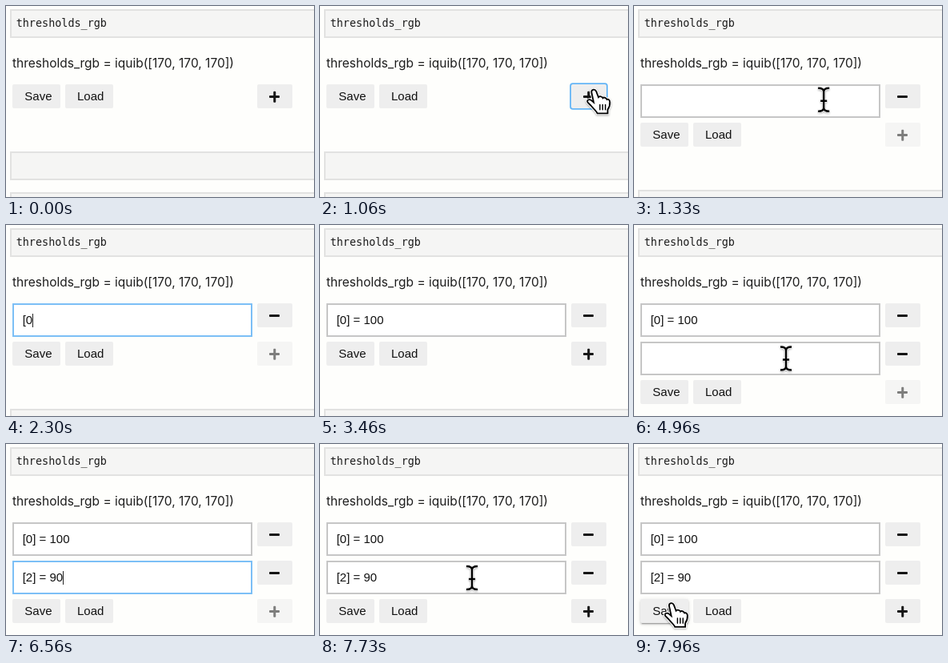
An HTML page that plays this animation: 385 by 239 pixels, repeating every 8 s.

```html
<!DOCTYPE html>
<html lang="en">
<head>
<meta charset="utf-8">
<title>iquib overrides</title>
<style>
  html, body { margin: 0; width: 100%; height: 100%; overflow: hidden; background: #fefefc; }
  #stage { position: relative; width: 385px; height: 239px; overflow: hidden; color: #1c1c1c; }
  #stage div { position: absolute; box-sizing: border-box; white-space: pre; }
  .cell {
    left: 5px; width: 400px; height: 36px; padding-left: 5.7px;
    background: #f5f5f4; border: 2px solid #e2e2e1;
    font: 13.45px/32px "DejaVu Sans Mono", monospace;
  }
  .value { left: 8px; top: 59.5px; font: 15.5px/24px Inter, sans-serif; }
  .button {
    height: 30px; background: #eee; border-radius: 2px;
    font: 15px/30px "Liberation Sans", Arial, sans-serif; color: #111;
  }
  .save { left: 8px; width: 60px; padding-left: 15.3px; }
  .load { left: 74px; width: 60px; padding-left: 15px; }
  .sign { left: 314px; width: 44px; }
  .sign::before, .plus::after {
    content: ""; position: absolute; left: 14.5px; top: 14px;
    width: 13.5px; height: 3px; border-radius: 1px; background: #151515;
  }
  .plus::after { transform: rotate(90deg); }
  .hover { box-shadow: 0 2px 2px rgba(0,0,0,.14), 0 3px 1px -2px rgba(0,0,0,.2), 0 1px 5px rgba(0,0,0,.12); }
  .pressed { box-shadow: 0 0 0 1.8px #64b5f6; }
  .disabled { opacity: .55; }
  .field {
    left: 8px; width: 300px; height: 42px; padding: 0 0 0 10.7px;
    background: #fff; border: 2px solid #c6c6c6; color: #111;
    font: 15px/20px "Liberation Sans", Arial, sans-serif;
  }
  #stage .field { display: flex; align-items: center; }
  #stage .focus { border-color: #7cbff6; }
  .field i { width: 1px; height: 17px; background: #222; }
  #stage [hidden] { display: none; }
  svg { position: absolute; left: 0; top: 0; }
  #cursor { filter: drop-shadow(0 1px 1px rgba(0,0,0,.3)); }
  .arrow path { fill: #000; stroke: #fff; stroke-width: 2; }
  .halo { fill: none; stroke: #fff; stroke-width: 4; }
  .hand path { stroke-linejoin: round; stroke-linecap: round; }
  .hand .ink { fill: #fff; stroke: #000; stroke-width: 2; }
  .beam .ink { fill: none; stroke: #000; stroke-width: 2.5; }
</style>
</head>
<body>
<div id="stage">
  <div class="cell" style="top:4px">thresholds_rgb</div>
  <div class="value">thresholds_rgb = iquib([170, 170, 170])</div>
  <div class="cell" id="next"></div>
  <div class="cell" id="last"></div>
  <div class="field"><span></span><i></i></div>
  <div class="field"><span></span><i></i></div>
  <div class="button sign"></div>
  <div class="button sign"></div>
  <div class="button save">Save</div>
  <div class="button load">Load</div>
  <div class="button sign plus"></div>
  <svg width="385" height="239">
    <defs>
      <path id="palm" d="M-4 3C-4-1 1-1.5 2.5 2L5.5 10C7 8 11 9 11.5 11C13 9.5 16.5 11 17 13C19 12 21 14 21 16.5C21.5 21 20 24 18 27V32H4C3 29-2 25-5 21L-9 17C-11 14-7 12-4.5 14L-1 17Z"/>
      <path id="bar" d="M-7-14.5C-3-14.5 0-13.5 0-10C0-13.5 3-14.5 7-14.5M-7 14.5C-3 14.5 0 13.5 0 10C0 13.5 3 14.5 7 14.5M0-11V11M-4 1.5H4"/>
    </defs>
    <g id="cursor">
      <g class="arrow"><path d="M0 0V23L5 18L9 27L13 25L9 16.5H16Z"/></g>
      <g class="hand" transform="scale(.92)">
        <use href="#palm" class="halo"/>
        <use href="#palm" class="ink"/>
        <path d="M7.5 20V27M11.2 20V27M14.9 20V27" stroke="#000" stroke-width="1.6"/>
      </g>
      <g class="beam">
        <use href="#bar" class="halo"/>
        <use href="#bar" class="ink"/>
      </g>
    </g>
  </svg>
</div>
<script>
const LOOP = 8000, TOP = 98, STEP = 48, BLINK = 268;

const rows = [
  { text: "[0] = 100", add: 1130, focus: 1430, enter: 3460,
    keys: [2130, 2300, 2430, 2530, 2630, 2730, 2800, 2900, 3000] },
  { text: "[2] = 90", add: 4600, focus: 5030, enter: 7260,
    keys: [5600, 5660, 5730, 5830, 6230, 6300, 6460, 6560] }
];
const presses = [[1010, 1130], [4510, 4600]];

// pointer trips: [time, x, y]; typing hides the pointer
const trips = [
  { end: 2130, path: [[730, 376, 83], [930, 349, 102], [1060, 343, 105], [1170, 343, 105], [1400, 208, 120.5]] },
  { end: 5600, path: [[4060, 241, 127], [4130, 363, 158], [4290, 363, 158], [4400, 356, 162], [4620, 356, 162], [4940, 190, 167]] },
  { end: LOOP, path: [[7730, 190, 167.5], [7950, 47.5, 199.5]] }
];

const all = s => [...document.querySelectorAll(s)];
const get = s => document.querySelector(s);
const fields = all(".field"), minus = all(".sign:not(.plus)");
const save = get(".save"), load = get(".load"), plus = get(".plus");
const cursor = get("#cursor");
const within = (t, a, b) => t >= a && t < b;
const place = (el, y) => { el.style.top = y + "px"; };

function pointer(t) {
  const trip = trips.find(p => within(t, p.path[0][0], p.end));
  if (!trip) return null;
  const path = trip.path, i = path.findIndex(k => k[0] > t);
  if (i < 0) return path[path.length - 1].slice(1);
  const [t0, x0, y0] = path[i - 1], [t1, x1, y1] = path[i];
  let u = (t - t0) / (t1 - t0);
  u = u * u * (3 - 2 * u);
  return [x0 + (x1 - x0) * u, y0 + (y1 - y0) * u];
}

function hit(el, p) {
  return p && !el.hidden && within(p[0], el.offsetLeft, el.offsetLeft + el.offsetWidth + 6) &&
    within(p[1], el.offsetTop, el.offsetTop + el.offsetHeight);
}

function drawRow(row, i, t) {
  const field = fields[i], [label, caret] = field.children;
  field.hidden = minus[i].hidden = t < row.add;
  place(field, TOP + STEP * i);
  place(minus[i], TOP + STEP * i);
  const typed = row.keys.filter(k => k <= t).length;
  const focused = within(t, row.focus, row.enter);
  const since = t - (typed ? row.keys[typed - 1] : row.focus);
  label.textContent = row.text.slice(0, typed);
  field.classList.toggle("focus", focused);
  caret.hidden = !focused || Math.floor(since / BLINK) % 2 === 1;
}

function draw(t) {
  rows.forEach((row, i) => drawRow(row, i, t));
  const shift = STEP * rows.filter(r => t >= r.add).length;
  [save, load, plus].forEach(b => place(b, TOP + shift));
  place(get("#next"), 182 + shift);
  place(get("#last"), 233 + shift);

  const locked = rows.some(r => within(t, r.add, r.enter));
  plus.classList.toggle("disabled", locked);
  plus.classList.toggle("pressed", presses.some(p => within(t, ...p)));

  const p = pointer(t);
  let kind = fields.some(f => hit(f, p)) ? "beam" : "arrow";
  for (const b of [save, load, plus, ...minus]) {
    const over = hit(b, p) && !(b === plus && locked);
    b.classList.toggle("hover", !!over && !b.classList.contains("pressed"));
    if (over) kind = "hand";
  }
  cursor.style.display = p ? "" : "none";
  if (p) cursor.setAttribute("transform", `translate(${p[0]} ${p[1]})`);
  for (const g of cursor.children) g.style.display = g.classList.contains(kind) ? "" : "none";
}

const start = performance.now();
function tick() {
  draw((performance.now() - start) % LOOP);
  requestAnimationFrame(tick);
}
tick();
</script>
</body>
</html>
```
